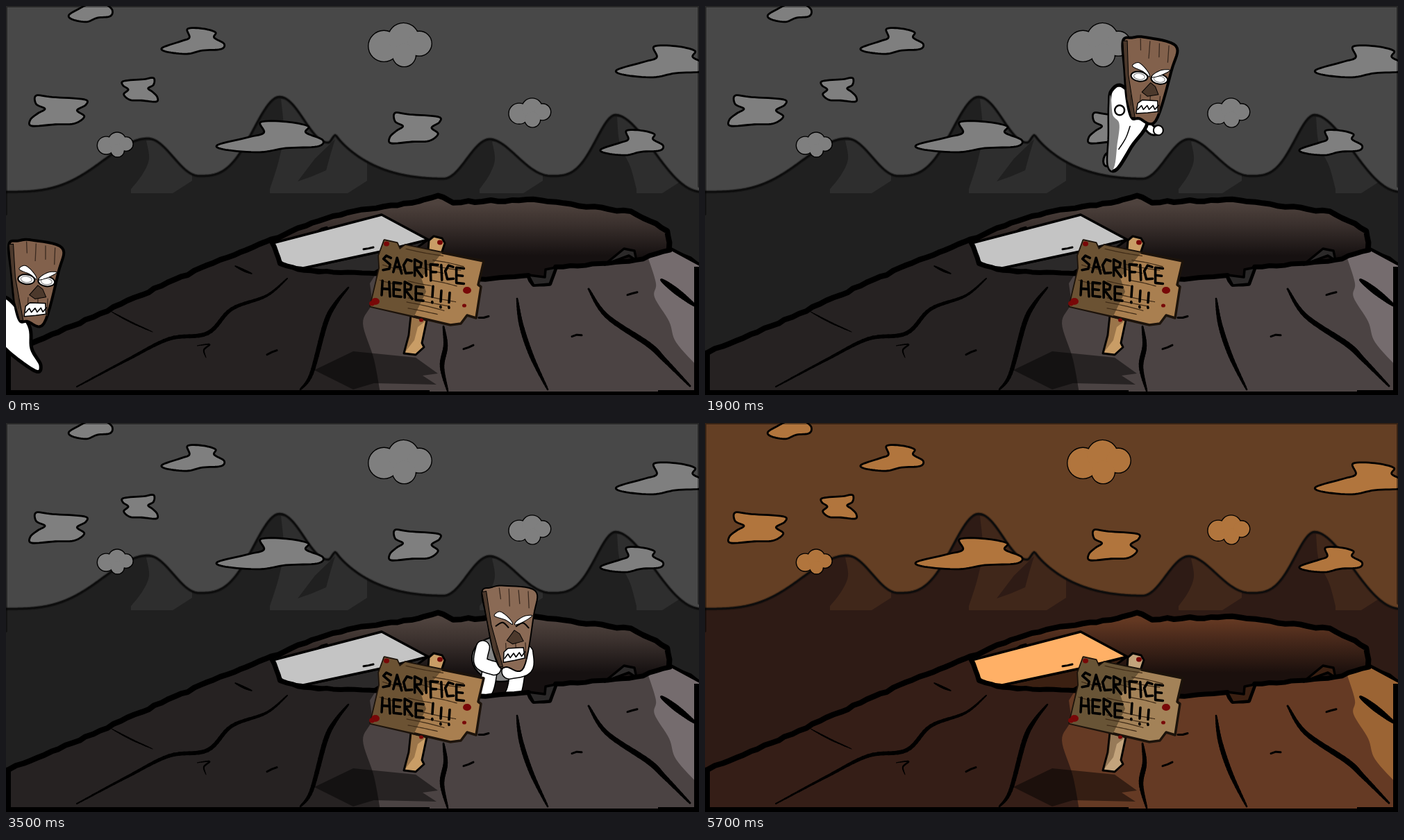
Recreate the animation shown at these times as an HTML page with a canvas. Size 998x561 px, loop 5900 ms.

```html
<!DOCTYPE html>
<html lang="en">
<head>
<meta charset="utf-8">
<title>Sacrifice here</title>
<style>
html, body { margin: 0; width: 100%; height: 100%; overflow: hidden; background: #000; }
canvas { display: block; width: 998px; height: 561px; }
</style>
</head>
<body>
<canvas id="stage" width="998" height="561">SACRIFICE HERE !!!</canvas>
<script>
const c = document.getElementById('stage').getContext('2d');
const W = 998, H = 561, LOOP = 5900, STEP = 100, FIRE = 3900;
const GREY = {
  sky: '#484848', cloud: '#7f7f7f', hill: '#202020', glow: '#2e2e2e', dark: '#262222', lit: '#4b4343',
  edge: '#756c6e', slab: '#c4c4c4', face: '#2b2929', pit: ['#4e423d', '#3a302d', '#161111'],
  board: '#a97f50', shade: '#6b5233', post: '#c99d66'
};
const HOT = {
  sky: '#643f24', cloud: '#b1753d', hill: '#2e1b15', glow: '#40271a', dark: '#351e17', lit: '#653a24',
  edge: '#9b6434', slab: '#ffb066', face: '#3b2012', pit: ['#633822', '#45271a', '#1b100d'],
  board: '#a38258', shade: '#685436', post: '#c3a47c'
};
let pal = GREY;

let seed = 7;
const rand = (lo, hi) => {
  seed = (seed * 16807) % 2147483647;
  return lo + (hi - lo) * seed / 2147483647;
};
const mix = (a, b, k) => a + (b - a) * k;
const mixPoint = (p, q, k) => p.map((v, i) => mix(v, q[i], k));
const ease = k => (1 - Math.cos(Math.PI * k)) / 2;

function points(s) {
  const n = s.split(' ').map(Number), p = [];
  for (let i = 0; i < n.length; i += 2) p.push([n[i], n[i + 1]]);
  return p;
}
const asPoints = p => typeof p === 'string' ? points(p) : p;

function poly(p, close = true) {
  const path = new Path2D();
  asPoints(p).forEach(q => path.lineTo(...q));
  if (close) path.closePath();
  return path;
}
// dense Catmull-Rom points
function spline(p, close) {
  p = asPoints(p);
  const n = p.length, out = [];
  const at = i => close ? p[(i + n) % n] : p[Math.max(0, Math.min(n - 1, i))];
  for (let i = 0; i < (close ? n : n - 1); i++) {
    const [a, b, d, e] = [at(i - 1), at(i), at(i + 1), at(i + 2)];
    for (let k = 0; k < 1; k += .125) {
      out.push(b.map((v, j) => v + k / 2 * (d[j] - a[j] + k * (2 * a[j] - 5 * v + 4 * d[j] - e[j]
        + k * (3 * (v - d[j]) + e[j] - a[j])))));
    }
  }
  if (!close) out.push(p[n - 1]);
  return out;
}
const curve = (p, close = true) => poly(spline(p, close), close);
// straight runs broken into short uneven pieces
function rough(p, amp = 1.3) {
  const out = [p[0]];
  for (let i = 1; i < p.length; i++) {
    const n = Math.ceil(Math.hypot(p[i][0] - p[i - 1][0], p[i][1] - p[i - 1][1]) / 11);
    for (let k = 1; k <= n; k++) out.push(mixPoint(p[i - 1], p[i], k / n).map(v => v + rand(-amp, amp)));
  }
  return out;
}
function oval(x, y, rx, ry = rx, a = 0) {
  const path = new Path2D();
  path.ellipse(x, y, rx, ry, a, 0, 7);
  return path;
}
function paint(path, fill, width = 0, line = '#000') {
  if (fill) { c.fillStyle = fill; c.fill(path); }
  if (width) { c.strokeStyle = line; c.lineWidth = width; c.stroke(path); }
}
function inside(path, draw) {
  c.save();
  c.clip(path);
  draw();
  c.restore();
}
function limb(p, width, edge = 4) {
  const path = curve(p, false);
  paint(path, null, width + edge);
  paint(path, null, width, '#fff');
}
// line that swells in the middle
function taper(p, width) {
  for (let i = 1; i < p.length; i++) {
    paint(poly([p[i - 1], p[i]], false), null, width * (.35 + .8 * Math.sin(Math.PI * i / p.length)));
  }
}
// keys: rows of [time, value, value, ...]
function tween(keys, t) {
  let i = 0;
  while (i < keys.length - 2 && t > keys[i + 1][0]) i++;
  const [t0, ...a] = keys[i], [t1, ...b] = keys[i + 1];
  return mixPoint(a, b, Math.max(0, Math.min(1, (t - t0) / (t1 - t0))));
}

// clouds: unit outlines fitted into boxes
const drift = points('-1 .5 -.4 .02 -.12 -.25 -.18 -.9 .3 -.92 .72 -.65 .68 -.25 1 .2 .9 .6 .3 .7 -.2 .95 -.85 .8');
const zigzag = points('-.75 -.95 -.2 -.85 .9 -.7 .95 -.35 .65 0 .9 .4 .55 .85 -.1 .9 -.9 1 -.95 .6 -.7 .2 -.45 -.1 -.75 -.4');
const fit = (shape, x0, y0, x1, y1) =>
  curve(shape.map(([u, v]) => [mix(x0, x1, (u + 1) / 2), mix(y0, y1, (v + 1) / 2)]));
const wisps = [
  fit(drift, 91, -22, 153, 24), fit(drift, 225, 31, 314, 70), fit(drift, 305, 165, 456, 212),
  fit(drift, 880, 56, 1010, 104), fit(drift, 857, 178, 946, 216),
  fit(zigzag, 33, 128, 117, 173), fit(zigzag, 219, 103, 167, 138), fit(zigzag, 551, 153, 626, 198)
];
const lobes = [[-.25, .02, .24], [.06, -.1, .24], [.31, -.02, .19], [.07, .16, .18]];
const puffs = [[567, 56, 91], [157, 200, 51], [754, 154, 60]].map(([x, y, w]) =>
  lobes.map(([u, v, r]) => oval(x + u * w, y + v * w, r * w)));

// mountain ridge: eased flanks between turning points [x, y, lean]
const turns = [[-4, 268, 1], [204, 191, 1.6], [278, 245, 1], [394, 131, 1.5], [464, 197, 1], [475, 186, 1],
  [630, 249, .45], [697, 192, 1], [785, 245, .9], [878, 157, 1.6], [1002, 268, .9]];
function ridgeY(x) {
  const i = Math.max(1, turns.findIndex(t => t[0] >= x));
  const [x0, y0] = turns[i - 1], [x1, y1, lean] = turns[i];
  return mix(y0, y1, ease(((x - x0) / (x1 - x0)) ** lean));
}
const ridgePoints = Array.from({ length: 503 }, (_, i) => [2 * i - 4, ridgeY(2 * i - 4)]);
const ridge = poly(ridgePoints, false);
const mountains = poly([...ridgePoints, [W + 4, H + 4], [-4, H + 4]]);
// lit flank: [peak, foot left, foot right]
const glows = [[202, 180, 268], [396, 380, 520], [700, 682, 773], [880, 908, 973]].map(([x, l, r]) => {
  const y = ridgeY(x) + 3;
  return poly([...spline([[x, y], [x + 4, mix(y, 270, .35)], [mix(x, l, .5) + 5, mix(y, 270, .65)], [l, 264]]),
    [l, 270], [r - 28, 270], [r, 252], [r, y]]);
});
const fold = poly('474 192 445 220 420 253 440 246 461 237 467 215');

// crater
const rimKeys = points('-5 503 85 466 205 412 290 374 382 337 470 302 585 283 622 273 645 283 760 279 900 297 953 324 956 350 1002 377');
const lipKeys = points('956 352 908 367 792 377 782 401 760 402 752 388 690 394 533 386 430 382 395 372 383 340');
const rim = rough(rimKeys), lip = rough(lipKeys, .8);
const ground = poly([...rim, [W + 4, H + 4], [-5, H + 4]]);
const pit = poly([...rimKeys.slice(4, 13), ...lipKeys]);
const front = poly([...lipKeys.slice(0, 8), ...spline('524 400 526 430 514 458 530 510 540 565'), [W + 4, H + 4], [W + 4, 377]]);
const bright = poly([[956, 352], ...spline('925 364 936 400 934 420 955 455 965 485 998 522'), [W + 4, 377]]);
const slab = poly([...spline('428 378 398 371 384 342'), [541, 301], [608, 337], [540, 354]]);
const slabFace = poly('608 337 540 354 430 378 480 384 530 384 590 350');
const blocks = ['862 373 890 350 905 353 908 367 897 360', '752 388 760 403 783 401 792 377 777 380 776 391'].map(s => poly(s));
const cracks = [
  [5, '405 393 375 418 325 437 290 472 235 480 175 510 102 549'], [6, '493 406 474 430 460 458 440 530 424 553'],
  [6, '630 462 633 490 628 520 636 555'], [6, '736 422 742 460 757 505 780 553'],
  [7, '839 408 865 447 925 488 948 510 985 548'], [8, '944 395 965 411 992 432'],
  [2, '152 441 180 456 211 470'], [3, '330 375 342 381 354 386'], [2, '275 490 293 488 285 496 288 507']
].map(([w, s]) => [w, spline(s)]);
const chips = [[383, 499], [666, 492], [822, 475], [902, 415], [688, 450], [522, 349], [455, 322]].map(([x, y]) =>
  poly([[x - 7, y + rand(-2, 4)], [x, y + rand(-1, 1)], [x + 7, y - rand(0, 4)]], false));
const shadow = poly('500 498 590 507 622 530 600 533 620 546 530 544 500 553 444 525');

// sign
const board = poly('545 338 563 342 567 351 575 345 688 368 680 402 684 405 677 450 664 446 655 458 640 460 525 433 538 378 537 360');
const boardShade = poly('545 338 563 342 567 351 575 345 628 356 598 392 605 412 588 447 525 433 538 378 537 360');
const postTop = poly('608 352 609 338 616 332 628 335 632 342 627 357');
const postLow = poly('583 447 606 453 599 486 602 492 590 503 573 501 580 475');
const grain = Array.from({ length: 12 }, (_, i) => {
  const v = (i + .7) / 12.5, u = rand(0, .55), span = rand(.2, .42);
  const at = k => [mix(545, 688, k) - 18 * v, 338 + 30 * k + 93 * v + rand(-1, 1)];
  return curve([at(u), at(u + span / 2), at(u + span)], false);
});
const blood = [[548, 343, 4], [532, 426, 6], [527, 429, 4], [664, 410, 6], [660, 432, 3], [625, 341, 4], [598, 453, 3]]
  .map(([x, y, r]) => oval(x, y, r, r * .85));

// brush letters on a unit square, strokes parted by "/"
const glyphs = {
  S: '.95 .1 .4 0 .05 .25 .85 .55 .75 .85 0 1', A: '0 1 .45 0 1 1/.2 .62 .85 .6', C: '.95 .1 .4 .05 0 .45 .25 .95 1 .85',
  R: '.1 1 .1 0 .9 .15 .8 .42 .15 .5 1 1', I: '.4 0 .6 1', F: '.15 1 .1 .05 1 0/.15 .5 .8 .45',
  E: '1 .03 .1 .05 .1 .95 1 .92/.1 .5 .85 .48', H: '.1 0 0 1/.9 0 1 1/.05 .55 .95 .5', '!': '.6 0 .4 .65/.35 .95 .4 1'
};
function lettering(word, x, y, slope, gap) {
  const strokes = [];
  for (const ch of word) {
    const narrow = 'I!'.includes(ch), w = narrow ? 5 : 12, h = 21 + rand(0, 4), top = y + rand(-2, 2);
    for (const s of glyphs[ch].split('/')) {
      strokes.push(poly(points(s).map(([u, v]) => [x + u * w, top + v * h + u * 2]), false));
    }
    const step = w + gap;
    x += step;
    y += step * slope;
  }
  return strokes;
}
const words = [
  ...lettering('SACRIFICE', 543, 361, .13, 2.8), ...lettering('HERE', 541, 394, .17, 4), ...lettering('!!!', 612, 404, .35, 7)
];

// hero, drawn around the middle of the mask
const maskShape = curve('-39 -45 -27 -53 -8 -58 37 -56 39 -20 34 56 10 58 -1 59 -14 34 -27 -6');
const maskSide = poly('-39 -45 -33 -47 -20 0 4 58 -1 59 -14 34 -27 -6');
const brows = ['-17 -13 -11 -20 -2 -17 8 -9 10 -4 0 -9', '37 -20 26 -18 16 -10 14 -4 26 -10'].map(s => curve(s));
const nose = poly('14 4 5 20 14 24 29 18 22 8');
const mouth = poly('3 37 8 31 30 27 34 42 20 47 4 52');
const teeth = poly(Array.from({ length: 8 }, (_, i) => [5 + 4 * i, 43 - i + (i % 2 ? -3 : 3)]), false);
const streaks = Array.from({ length: 8 }, (_, i) => {
  const x = -22 + 7 * i, y = i % 2 ? -54 : 26 - i;
  return poly([[x + (y > 0 ? 12 : 0), y], [x + (y > 0 ? 16 : 4), y + rand(12, 26)]], false);
});
const stand = points('-22 19 -38 28 -36 50 -26 92 -17 134 -4 137 9 100 22 56');
const stride = points('-30 26 -48 30 -58 50 -40 92 8 130 17 122 4 98 0 64');

function drawMask(shut) {
  paint(maskShape, shut ? '#8a6a55' : '#82614c', shut ? 2 : 4);
  paint(maskSide, '#4c392c', 1);
  streaks.forEach(s => paint(s, null, 1.3, '#3a2a20'));
  for (const [x, y] of [[-4, -1], [25, -4]]) {
    if (shut) paint(curve([[x - 9, y + 2], [x, y - 4], [x + 9, y + 2]], false), null, 2);
    else {
      paint(oval(x, y, 12, 7, -.1), '#fff', 2);
      paint(oval(x, y, 8, 4.5, -.1), null, 1, '#777');
    }
  }
  brows.forEach(b => paint(b, '#fff', 1));
  paint(nose, '#4c392c', 1);
  paint(mouth, '#fff', 1.5);
  paint(teeth, null, 1.6);
}
function drawWalker(k) {
  const body = curve(stand.map((p, i) => mixPoint(p, stride[i], k)));
  const still = k < .6;
  if (still) {
    paint(oval(-20, 126, 6, 10), '#777', 3);
    limb('18 60 32 70 40 68', 9, 6);
    paint(oval(41, 68, 7), '#fff', 2);
  }
  paint(body, '#fff', 5);
  if (still) {
    inside(body, () => paint(curve('-40 38 -28 62 -16 72 -12 100 -10 140 -40 140'), '#858585'));
    paint(curve('0 72 -2 90 -8 108', false), null, 1.5);
    paint(oval(-20, 53, 7), '#fff', 2.5);
  }
}
function drawCurled() {
  paint(oval(-2, 48, 40, 32), '#858585', 2);
  for (const x of [-26, 14]) {
    limb([[x + 12, 66], [x + 10, 92], [x, 114]], 20, 3);
    paint(oval(x - 3, 117, 10, 13, .5), '#858585', 2);
  }
  limb('34 34 36 55 14 64', 20, 3);
  limb('-28 34 -28 56 -8 62', 18, 3);
}

// time, centre x, centre y, turn in degrees
const travel = [
  [0, 33, 426, 0], [600, 192, 356, 0], [1400, 409, 270, 0], [1500, 425, 282, 0], [1800, 588, 160, 12],
  [2100, 690, 78, 17], [2400, 775, 122, 33], [2500, 776, 145, 70], [3000, 712, 255, 250], [3400, 715, 309, 362],
  [3500, 715, 323, 367], [3800, 715, 500, 367]
];
function drawHero(t) {
  const [x, y, turn] = tween(travel, t);
  const curled = t >= 2000;
  const swing = t < 1400 ? ease(1 + t / 200) : 0;
  c.save();
  c.translate(x, y);
  c.rotate(turn * Math.PI / 180);
  c.translate(0, -30);
  if (curled) drawCurled(); else drawWalker(swing);
  c.rotate(swing * .21);
  drawMask(curled);
  c.restore();
}

// lava: a flared column with arms [width, points]
const column = points('720 400 714 330 696 264 740 270 785 272 828 262 812 320 804 400');
const arms = [[18, '712 276 700 254 684 244'], [20, '722 276 717 240 710 207'], [17, '760 285 762 240 764 207'],
  [15, '803 268 803 238 791 231'], [18, '816 276 829 232 845 206'], [25, '756 154 755 160'], [16, '782 191 782 193']]
  .map(([w, s]) => [w, points(s)]);
// time, spread, height
const surge = [[3900, .6, .25], [4300, 1.2, 1], [4500, 1.6, 1.17], [4800, 1, 1], [5100, 1.6, 1.17], [5400, .75, .97], [5700, .5, 0]];
function drawLava(t) {
  const [spread, rise] = tween(surge, t);
  const move = ([x, y]) => {
    const up = 395 - y;
    return [762 + (x - 762) * (1 + (spread - 1) * up / 200), 395 - up * rise];
  };
  const body = poly(column.map(move));
  for (const [color, grow] of [['#000', 4], ['#c80000', 0], ['#ff8000', -13]]) {
    for (const [w, p] of arms) if (w + grow > 0) paint(curve(p.map(move), false), null, w + grow, color);
    if (grow >= 0) paint(body, color, grow + 2, color);
    else inside(body, () => {
      paint(body, color, 12, '#c80000');
      for (const [w, p] of arms) paint(curve(p.map(move), false), null, w + grow, color);
    });
  }
}

function drawBack() {
  paint(poly([[0, 0], [W, 0], [W, H], [0, H]]), pal.sky);
  paint(mountains, pal.hill);
  inside(mountains, () => glows.forEach(g => paint(g, pal.glow)));
  paint(fold, pal.hill);
  paint(ridge, null, 5, 'rgba(0,0,0,.3)');
  paint(ridge, null, 2.5, '#0c0c0c');
  wisps.forEach(p => paint(p, pal.cloud, 2.8));
  for (const puff of puffs) {
    puff.forEach(p => paint(p, null, 2.8));
    puff.forEach(p => paint(p, pal.cloud));
  }
  paint(poly([[0, 300], [0, 0], [W, 0], [W, 260]], false), null, 4, 'rgba(0,0,0,.45)');
  paint(ground, pal.dark);
  const g = c.createLinearGradient(0, 285, 0, 385);
  [0, .3, .75].forEach((s, i) => g.addColorStop(s, pal.pit[i]));
  paint(pit, g);
  paint(slabFace, pal.face, 3);
  paint(slab, pal.slab, 3.5);
  paint(poly(rim, false), null, 8);
}
function drawFront() {
  paint(front, pal.lit);
  paint(bright, pal.edge);
  paint(poly(lip, false), null, 7);
  blocks.forEach(b => paint(b, pal.face, 3.5));
  cracks.forEach(([w, p]) => taper(p, w));
  chips.forEach(p => paint(p, null, 3));
  paint(shadow, 'rgba(0,0,0,.48)');
  c.fillStyle = '#000';
  c.fillRect(0, 500, 7, 61);
  c.fillRect(991, 376, 7, 185);
  c.fillRect(0, 554, 610, 7);
  c.fillRect(610, 556, 388, 5);
  c.fillRect(939, 554, 59, 7);
}
function drawSign() {
  paint(postTop, pal.post, 3);
  paint(postLow, pal.post, 3);
  paint(poly('583 448 606 453 593 463 588 482 574 500 580 475'), 'rgba(70,45,20,.35)');
  paint(board, pal.board, 3.5, '#1c130b');
  paint(boardShade, pal.shade);
  grain.forEach(p => paint(p, null, 1.2, '#3f2b17'));
  blood.forEach(p => paint(p, '#780808'));
  words.forEach(p => paint(p, null, 3.6));
}

function draw(now) {
  const t = Math.floor(now % LOOP / STEP) * STEP;
  pal = t < FIRE ? GREY : HOT;
  c.lineJoin = c.lineCap = 'round';
  drawBack();
  const inPit = t >= 2500;
  if (inPit && t < 3800) drawHero(t);
  if (t >= FIRE && t < 5700) drawLava(t);
  drawFront();
  if (!inPit) drawHero(t);
  drawSign();
}
let start;
function frame(now) {
  start ??= now;
  draw(now - start);
  requestAnimationFrame(frame);
}
draw(0);
requestAnimationFrame(frame);
</script>
</body>
</html>
```
